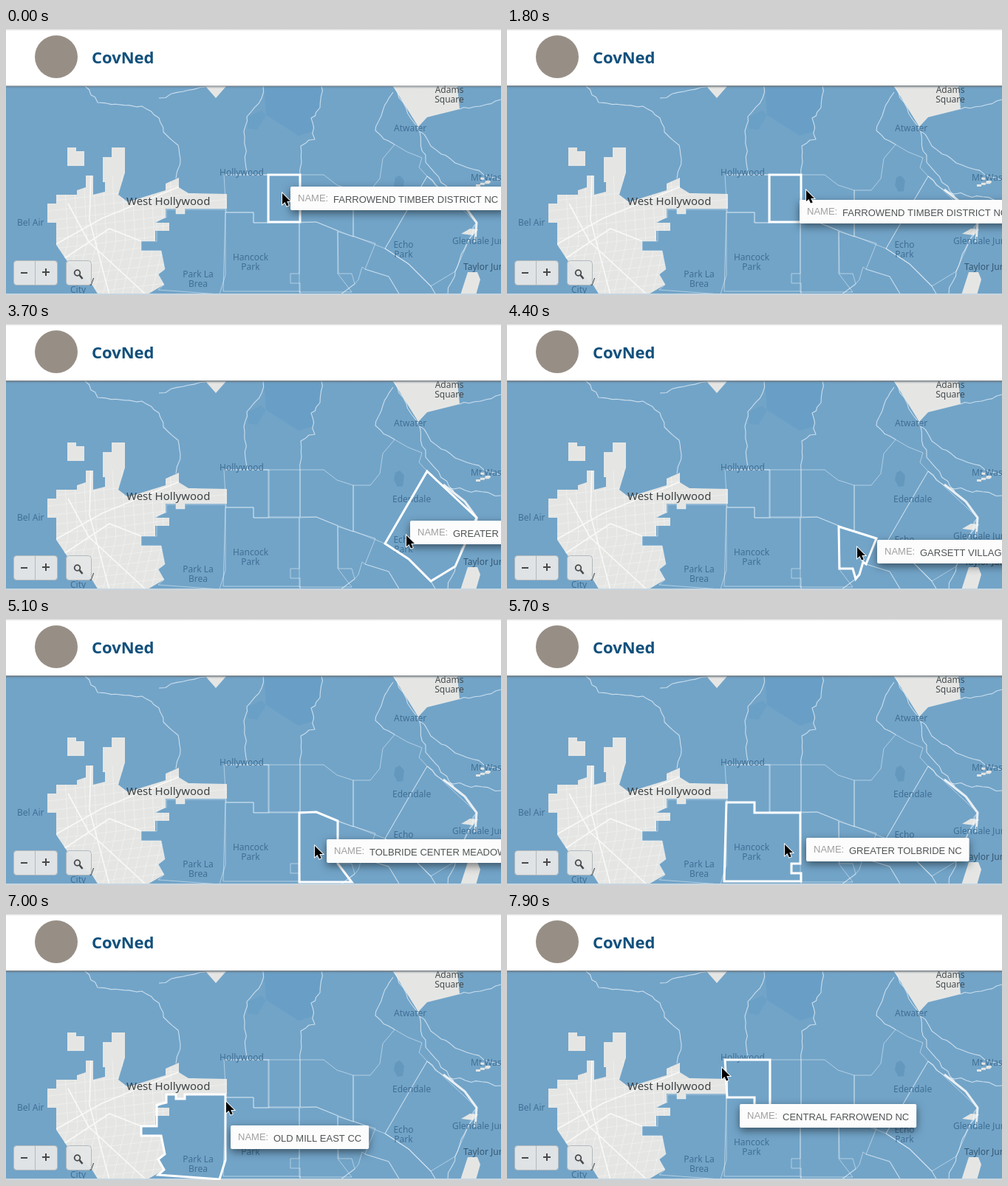
These frames come from a looping animation (670 px wide and 362 px high, 8 s). An HTML page with a canvas:

```html
<!DOCTYPE html>
<html lang="en">
<head>
<meta charset="utf-8">
<title>District map</title>
<style>
html, body { margin: 0; width: 100%; height: 100%; overflow: hidden; background: #fff; }
canvas { display: block; width: 670px; height: 362px; }
</style>
</head>
<body>
<canvas id="stage" width="670" height="362"></canvas>
<script>
const W = 670, H = 362, TOP = 79, LOOP = 8000, STEP = 100;
const TIP_LAG = 100, HOVER_LAG = 50, LEAVE = 7400;
const ctx = document.getElementById('stage').getContext('2d');
const map = document.createElement('canvas');
map.width = W;
map.height = H;

let seed = 7;
const random = () => (seed = seed * 16807 % 2147483647) / 2147483647;

const points = text => text.split(' ').map(pair => pair.split(',').map(Number));

function outline(pts, closed) {
  const path = new Path2D();
  pts.forEach(p => path.lineTo(...p));
  if (closed) path.closePath();
  return path;
}

const shape = text => outline(points(text), true);

function box(x, y, w, h) {
  const path = new Path2D();
  path.rect(x, y, w, h);
  return path;
}

// a natural border: key points joined by slightly wandering segments
function wander(text, amount) {
  const pts = points(text), out = [pts[0]];
  for (let i = 1; i < pts.length; i++) {
    const [ax, ay] = pts[i - 1], [bx, by] = pts[i];
    const n = Math.ceil(Math.hypot(bx - ax, by - ay) / 9);
    for (let k = 1; k <= n; k++) {
      const off = () => k < n ? (random() - .5) * amount : 0;
      out.push([ax + (bx - ax) * k / n + off(), ay + (by - ay) * k / n + off()]);
    }
  }
  return outline(out);
}

function fill(g, path, color) {
  g.fillStyle = color;
  g.fill(path);
}

function stroke(g, path, color, width) {
  g.strokeStyle = color;
  g.lineWidth = width;
  g.stroke(path);
}

const line = (g, text, color, width) => stroke(g, outline(points(text)), color, width);

const districts = [
  ['FARROWEND TIMBER DISTRICT NC', box(355, 199, 43, 64)],
  ['EAST FARROWEND NC', shape('398,199 430,199 448,213 470,220 470,283 420,263 398,263')],
  ['PILTER VALE NC', shape('526,158 543,168 563,176 559,189 570,201 548,238 513,299 470,282 470,220 493,220 506,204 510,177')],
  ['GARSETT VILLAGE NC', shape('449,276 500,292 486,327 482,324 477,341 472,347 468,333 450,333')],
  ['GREATER FERN CROFT ADALINE NC', shape('570,201 637,264 608,330 575,350 545,320 513,299')],
  ['TOLBRIDE CENTER MEADOWTON NC', shape('397,264 420,263 449,275 449,333 468,358 397,358')],
  ['GREATER TOLBRIDE NC', shape('297,250 335,250 335,264 397,264 397,333 385,333 385,346 398,346 398,357 294,357')],
  ['OLD MILL EAST CC', shape('297,246 242,246 242,252 230,252 230,246 217,246 217,257 204,260 204,289 183,289 183,302 210,302 215,327 206,334 214,348 206,355 289,361 297,335')],
  ['CENTRAL FARROWEND NC', shape('295,199 356,199 356,264 335,264 335,250 298,250')]
];

// pointer stops: time, x, y
const stops = [
  [0, 374, 224], [1600, 374, 224], [1700, 385, 242], [1800, 405, 220], [2000, 440, 226],
  [2700, 442, 228], [2800, 473, 242], [2900, 500, 224], [3200, 512, 230], [3800, 548, 300],
  [3900, 548, 300], [4300, 490, 303], [4400, 474, 304], [4800, 432, 310], [5600, 394, 307],
  [5700, 376, 307], [6400, 268, 322], [6500, 268, 322], [6900, 293, 297], [7000, 298, 256],
  [7300, 304, 268], [7400, 291, 210], [8000, 291, 210]
];

function pointerAt(t) {
  t = Math.max(t, 0);
  const i = Math.max(1, stops.findIndex(s => s[0] >= t));
  const [t0, x0, y0] = stops[i - 1], [t1, x1, y1] = stops[i];
  const p = (t - t0) / (t1 - t0);
  return [Math.round(x0 + (x1 - x0) * p), Math.round(y0 + (y1 - y0) * p)];
}

function drawLand(g) {
  fill(g, box(0, TOP, W, H), '#72a4c8');
  fill(g, shape('349,79 426,79 425,108 413,122 416,140 396,146 352,118'), 'rgba(90,151,194,.4)');
  fill(g, shape('346,112 352,118 340,138 327,136 328,120'), 'rgba(90,151,194,.3)');
  fill(g, shape('527,203 533,200 539,207 537,221 530,222 525,213'), 'rgba(86,139,178,.5)');

  const pale = '#e5e6e4';
  const city = shape('108,200 118,200 118,226 134,222 134,196 161,196 152,226 165,236 190,228 216,220 216,211 234,203 234,216 247,224 299,225 299,245 242,245 242,252 230,252 230,245 216,245 216,257 202,264 221,264 221,275 202,275 202,289 183,289 183,302 210,302 215,327 206,334 214,348 190,362 125,362 117,349 84,318 68,294 68,264 56,264 56,238 68,238 68,226 96,226 96,220 108,216');
  [
    city,
    box(83, 162, 12, 25), box(95, 167, 11, 20),
    box(131, 175, 12, 34), box(143, 162, 18, 35),
    shape('524,79 558,134 570,121 614,110 611,79'),
    shape('270,79 284,95 298,79'),
    shape('625,331 638,331 642,341 636,362 615,362'),
    shape('616,279 628,272 639,273 632,281')
  ].forEach(path => fill(g, path, pale));
  for (let i = 0; i < 6; i++) fill(g, box(636 + random() * 18, 200 + random() * 13, 6, 3), pale);

  // streets
  g.save();
  g.clip(city);
  for (let i = 0; i < 12; i++) {
    const x = 66 + i * 13, y = 222 + i * 13;
    line(g, `${x},362 ${x + 18},290 ${x + 13},200`, 'rgba(255,255,255,.35)', 1);
    line(g, `50,${y + 14} 300,${y - 16}`, 'rgba(255,255,255,.3)', 1);
  }
  ['66,294 130,258 235,215', '84,238 112,290 190,362', '115,200 113,260 140,362', '183,289 140,272 75,315']
    .forEach(road => line(g, road, '#f9f9f7', 1.6));
  g.restore();
}

function drawBorders(g) {
  g.lineJoin = 'round';
  const color = 'rgba(240,247,251,.7)';
  [
    '107,79 124,101 184,106 207,122 213,141 233,159 236,178 230,204',
    '207,95 240,86 270,80',
    '348,79 346,95 326,120 322,140 327,199',
    '427,79 425,108 413,122 418,151 399,160 398,199',
    '526,158 500,139 510,112 524,87',
    '558,134 568,182 606,228',
    '524,79 549,124 575,160 608,183 670,207',
    '570,201 596,223 670,234',
    '614,110 642,106 670,97',
    '637,264 608,330 598,362'
  ].forEach(text => stroke(g, wander(text, 4), color, 1.1));
  ['295,199 355,199', '398,357 398,362', '513,299 545,320 575,350 582,362', '486,327 518,337 533,362', '472,347 452,362']
    .forEach(text => line(g, text, color, 1.1));
  districts.forEach(d => stroke(g, d[1], 'rgba(240,247,251,.5)', 1));
  line(g, '592,219 621,242 637,264 635,290', 'rgba(245,248,249,.9)', 3);
}

function label(g, text, x, y, color = '#416f94', size = 12) {
  g.font = size + 'px "Noto Sans", "Open Sans", sans-serif';
  g.fillStyle = color;
  text.split('|').forEach((row, i) => g.fillText(row, x, y + i * 12.5));
}

function drawLabels(g) {
  const dark = '#444a4d';
  label(g, 'West Hollywood', 163, 240, '#3c4143', 15);
  label(g, 'Hollywood', 289, 200);
  label(g, 'Bel Air', 15, 268);
  label(g, 'Atwater', 525, 140);
  label(g, 'Edendale', 523, 243);
  label(g, 'Mt Washington', 629, 207);
  label(g, 'Glendale Junction', 604, 293);
  label(g, 'Taylor Junction', 619, 328, '#36576f');
  label(g, 'y', 113, 346, dark);
  label(g, 'City', 87, 359);
  g.textAlign = 'center';
  label(g, 'Hancock|Park', 331, 315);
  label(g, 'Park La|Brea', 260, 338);
  label(g, 'Echo|Park', 538, 298);
  label(g, 'Adams|Square', 600, 88, dark);
  g.textAlign = 'left';
}

function drawHeader(g) {
  fill(g, box(0, 0, W, TOP - 1), '#fff');
  const bands = [[0, 4, '#c4c4c4', '#fff'], [TOP - 1, 4, 'rgba(120,125,130,.75)', 'rgba(80,100,115,0)']];
  bands.forEach(([y, h, from, to]) => {
    const shade = g.createLinearGradient(0, y, 0, y + h);
    shade.addColorStop(0, from);
    shade.addColorStop(1, to);
    fill(g, box(0, y, W, h), shade);
  });
  const seal = new Path2D();
  seal.arc(68, 39, 29, 0, 7);
  fill(g, seal, '#978f86');
  g.font = '700 22px "Open Sans", "Noto Sans", sans-serif';
  g.fillStyle = '#11507c';
  g.fillText('CovNed', 116, 48);
}

function drawControls() {
  const ink = '#484848', edge = '#b3b9bc';
  [[10.5, 59], [81.5, 34]].forEach(([x, w]) => {
    const button = new Path2D();
    button.roundRect(x, 315.5, w, 33, 4);
    fill(ctx, button, 'rgba(229,231,231,.95)');
    stroke(ctx, button, edge, 1);
  });
  line(ctx, '39.5,316 39.5,348', edge, 1);
  line(ctx, '20,332 29,332', ink, 2);
  line(ctx, '49,331 59,331', ink, 2);
  line(ctx, '54,326 54,336', ink, 2);
  const lens = new Path2D();
  lens.arc(96.5, 332, 3.8, 0, 7);
  stroke(ctx, lens, ink, 1.8);
  line(ctx, '99.5,335 103.5,340', ink, 2.5);
}

function drawTip(text, x, y) {
  ctx.font = '13px "Liberation Sans", Arial, sans-serif';
  const card = new Path2D();
  card.roundRect(x, y, 68 + ctx.measureText(text).width, 32, 2);
  ctx.save();
  ctx.shadowColor = 'rgba(0,0,0,.5)';
  ctx.shadowBlur = 12;
  ctx.shadowOffsetY = 4;
  fill(ctx, card, '#fcfcfc');
  ctx.restore();
  ctx.fillStyle = '#a0a0a0';
  ctx.fillText('NAME:', x + 10, y + 20);
  ctx.fillStyle = '#505456';
  ctx.fillText(text, x + 58, y + 22);
}

const arrow = shape('0,0 0,15 3.5,12 6,17.5 8.7,16.4 6.3,11 11,11');

function drawPointer(x, y) {
  ctx.save();
  ctx.translate(x, y);
  stroke(ctx, arrow, '#fff', 1.8);
  fill(ctx, arrow, '#000');
  ctx.restore();
}

function frame(now) {
  const t = Math.floor(now % LOOP / STEP) * STEP;
  // the hover freezes once the pointer has left the districts
  const live = Math.min(t, LEAVE);
  const hover = pointerAt(live - HOVER_LAG);
  const [tipX, tipY] = pointerAt(live - TIP_LAG);
  const hit = districts.find(d => ctx.isPointInPath(d[1], ...hover));
  ctx.drawImage(map, 0, 0);
  if (hit) stroke(ctx, hit[1], '#fff', 3);
  drawControls();
  if (hit) drawTip(hit[0], tipX + 11, tipY - 9);
  drawPointer(...pointerAt(t));
  requestAnimationFrame(frame);
}

const base = map.getContext('2d');
drawLand(base);
drawBorders(base);
drawLabels(base);
fill(base, box(0, 360, W, 2), '#c8d6df');
drawHeader(base);
requestAnimationFrame(frame);
</script>
</body>
</html>
```
